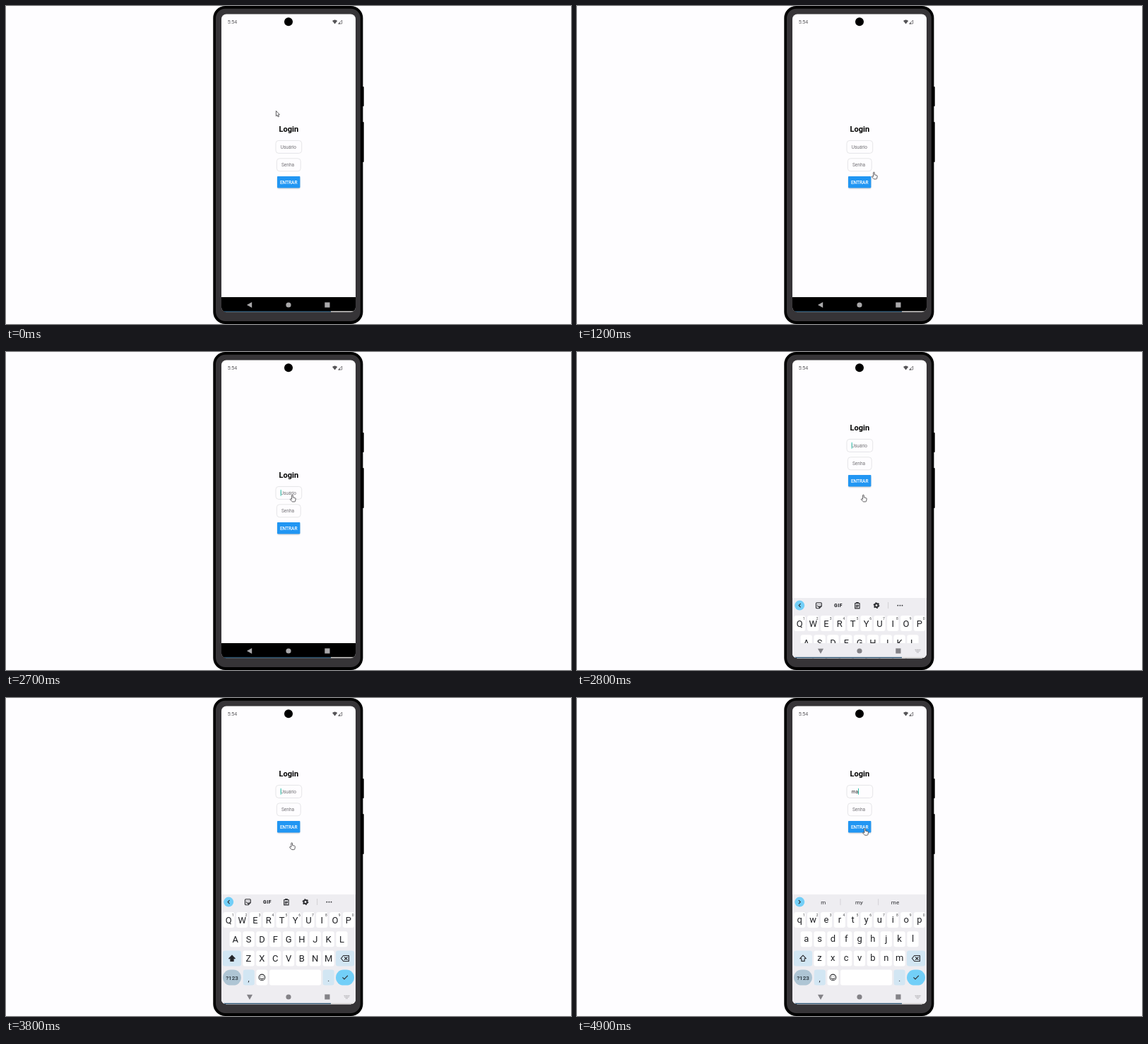
Animation, 800 px wide and 450 px high, one loop 5000 ms. Source, as an HTML page:

```html
<!DOCTYPE html>
<html lang="pt">
<head>
<meta charset="utf-8">
<title>Login</title>
<style>
html, body { margin: 0; width: 100%; height: 100%; overflow: hidden; background: #fefdff; }
svg { display: block; width: 100vw; height: 100vh; font-family: Roboto, sans-serif; }
.line { fill: none; stroke: #2c2d31; stroke-width: 1.15; stroke-linecap: round; stroke-linejoin: round; }
.mid { text-anchor: middle; }
.key { font-size: 13px; fill: #202125; }
.num { font-size: 5px; fill: #45464a; }
.field { fill: #fefdff; stroke: #dcdbde; stroke-width: .7; }
.label { font-size: 6.5px; fill: #717074; }
</style>
</head>
<body>
<svg viewBox="0 0 800 450">
  <defs>
    <clipPath id="screen"><rect x="305" y="11.5" width="190" height="421.8" rx="7"/></clipPath>
    <filter id="blur" x="-20%" y="-40%" width="140%" height="180%"><feGaussianBlur stdDeviation=".8"/></filter>
  </defs>
  <path d="M504 114h1.7q1 0 1 1v26q0 1-1 1h-1.7zM504 164h1.7q1 0 1 1v55q0 1-1 1h-1.7z"/>
  <rect x="293.3" width="212.1" height="450" rx="17"/>
  <rect x="297" y="3.7" width="204.8" height="442.2" rx="13.5" fill="#363437"/>

  <g clip-path="url(#screen)">
    <rect x="305" y="11" width="190" height="423" fill="#fefdff"/>
    <text x="313.7" y="25" font-size="7" fill="#5a595c">5:54</text>
    <path d="M462 21q3.6-3 7.2 0l-3.6 4.6z" fill="#555457"/>
    <path d="M475.7 20v5h-5z" fill="none" stroke="#656467" stroke-width=".8"/>
    <path d="M473 23v2.5h-3z" fill="#656467"/>
    <circle cx="400" cy="22.3" r="6"/>

    <g id="form">
      <text class="mid" x="400.3" y="177.6" font-size="11" font-weight="700">Login</text>
      <rect class="field" x="382" y="190.4" width="36.7" height="18" rx="4"/>
      <text class="label" id="user" x="388.8" y="201.7">Usuário</text>
      <rect id="caret" y="194.9" width="1" height="8.8" fill="#2fc0aa"/>
      <rect class="field" x="383.4" y="215.8" width="33.8" height="18" rx="4"/>
      <text class="label" x="390" y="227.2">Senha</text>
      <rect x="384.6" y="242.4" width="31.4" height="15.9" rx="1" opacity=".25" filter="url(#blur)"/>
      <rect x="384" y="241" width="32.4" height="16.4" rx=".8" fill="#2196f3"/>
      <text class="mid" x="400.2" y="251.7" font-size="6.5" font-weight="500" fill="#fff">ENTRAR</text>
    </g>

    <g id="board">
      <rect x="305" y="278" width="190" height="156" fill="#eeedf1"/>
      <circle cx="315.2" cy="288.6" r="7" fill="#72cff8"/>
      <path class="line" id="chevron" d="M1.1-2.2L-1.1 0 1.1 2.2"/>
      <g id="tools">
        <path class="line" d="M339.5 284.7h5.8q1 0 1 1v4l-3 3h-3.8q-1 0-1-1v-6q0-1 1-1zM346.3 289.7h-2q-1 0-1 1v2M340.3 289q1.2 1.8 2.6 1.2M341 287v.1M344 287v.1"/>
        <text class="mid" x="370" y="291" font-size="6.8" font-weight="900" letter-spacing=".5" fill="#2c2d31">GIF</text>
        <path class="line" d="M393.7 285.5h6.4v7.4h-6.4zM395.5 285.5v-1h2.8v1M395.3 288h3.2M395.3 289.5h3.2M395.3 291h2"/>
        <circle class="line" cx="424" cy="288.6" r="2.5" style="stroke-width:2"/>
        <circle class="line" cx="424" cy="288.6" r="3.8" stroke-dasharray="1.8 2.18" style="stroke-width:1.3;stroke-linecap:butt"/>
        <path d="M440.6 284v9" stroke="#c5c4c9" stroke-width=".7"/>
        <g fill="#2c2d31"><circle cx="454.3" cy="288.7" r=".9"/><circle cx="457.4" cy="288.7" r=".9"/><circle cx="460.5" cy="288.7" r=".9"/></g>
      </g>
      <g id="hints" class="mid" font-size="8" fill="#2c2d31">
        <text x="348.7" y="291.7">m</text><text x="399.5" y="291.7">my</text><text x="450.5" y="291.7">me</text>
        <path d="M373 284.2v9M426.6 284.2v9" stroke="#c9c8cd" stroke-width=".7"/>
      </g>
      <g id="keys"></g>
      <path class="line" id="shift" d="M320 364.2l4.3 4.5h-2.2v3.7h-4.2v-3.7h-2.2z"/>
      <path class="line" d="M477.8 364.5h7.6v8h-7.6l-3.4-4zM479.4 366.6l3.8 3.8M483.2 366.6l-3.8 3.8"/>
      <text class="mid" x="320" y="398.6" font-size="8.1" font-weight="500" fill="#26323a">?123</text>
      <text class="mid key" x="343.7" y="400.5" style="font-size:11px">,</text>
      <circle class="line" cx="362.4" cy="395.4" r="4.3"/>
      <path class="line" d="M360.2 396.7q2.2 2.4 4.4 0M360.8 394v.1M364 394v.1"/>
      <text class="mid key" x="456.7" y="400.5" style="font-size:11px">.</text>
      <path class="line" d="M476.8 395.7l2.2 2.2 4.6-4.7"/>
    </g>

    <rect id="bar" x="305" y="412" width="190" height="22"/>
    <g id="nav">
      <path id="back" d="M-4 0L3.2-4.1V4.1z"/>
      <circle cx="400" cy="423" r="3.6"/>
      <rect x="451.3" y="419.4" width="7.2" height="7.2"/>
    </g>
    <path id="mini" d="M478.6 421.3h8M479.3 423.2h6.6M481 425.1h3.2" stroke="#9a999e" stroke-width=".9" stroke-dasharray="1.2 .5"/>
    <path d="M308 432.5h152" stroke="#2d5674" stroke-width="1.4"/>
    <path d="M460 432.5h33" stroke="#d8d5d4" stroke-width="1.4"/>
  </g>

  <g id="cursor" fill="#fefdff" stroke="#454447" stroke-width=".85" stroke-linejoin="round">
    <path id="arrow" d="M-2.6-4.4V3L-.9 1.6.2 4.1 1.5 3.5.4 1.1 2.4.9z"/>
    <path id="hand" d="M-1.4 1.3V-4a.85.85 0 0 1 1.7 0V-1.2L3.2-.5Q4.3-.2 4.2.9L3.6 4Q3.4 4.9 2.6 4.9H-.2Q-.8 4.9-1.2 4.4L-3.6 1.7Q-3.7.8-2.9.8z"/>
  </g>
</svg>
<script>
const $ = id => document.getElementById(id);
const show = (id, on) => $(id).style.display = on ? '' : 'none';
const PITCH = 18.85, ROWS = ['QWERTYUIOP', 'ASDFGHJKL', 'ZXCVBNM'], LEFT = [315.3, 324.7, 343.5];

// Keyboard
const cap = (x, y, w, fill = '#fff', r = 3) =>
  `<rect x="${x}" y="${y}" width="${w}" height="22" rx="${r}" fill="${fill}"/>`;
let html = '';
ROWS.forEach((row, r) => [...row].forEach((c, i) => {
  const x = LEFT[r] + i * PITCH, y = 303 + r * 27.2;
  html += cap(x - 8.1, y, 16.2) + `<text class="mid key letter" x="${x}" y="${y + 15.8}">${c}</text>`;
  if (!r) html += `<text class="mid num" x="${x + 6.1}" y="308.6">${(i + 1) % 10}</text>`;
}));
const PALE = '#d2e6f3';
html += cap(307, 357.4, 26, PALE) + cap(467, 357.4, 26, PALE) +
  cap(307, 384.6, 26, '#aec5d4', 11) + cap(335.8, 384.6, 16, PALE) + cap(354.4, 384.6, 16) +
  cap(373, 384.6, 73) + cap(448.6, 384.6, 16, PALE) + cap(467, 384.6, 26, '#72cff8', 11);
$('keys').innerHTML = html;
const letters = document.querySelectorAll('.letter');

// Pointer: time, x, y
const PATH = [[0, 385, 152.8], [600, 409, 248], [700, 469.5, 328.5], [800, 476, 338], [1200, 421, 240],
  [1700, 406, 207], [2900, 406, 207], [3800, 405.2, 209.7], [4000, 405.2, 209.7], [4400, 408.3, 189.3], [5000, 408.3, 189.3]];
function pointer(t) {
  const i = PATH.findIndex(p => p[0] > t), [t0, x0, y0] = PATH[i - 1], [t1, x1, y1] = PATH[i];
  const k = (1 - Math.cos(Math.PI * (t - t0) / (t1 - t0))) / 2;
  return [x0 + (x1 - x0) * k, y0 + (y1 - y0) * k];
}

function draw(t) {
  const open = t >= 2800, typed = t >= 4600, hints = t >= 4700;
  const text = t >= 4900 ? 'ma' : typed ? 'm' : '';

  $('form').setAttribute('transform', `translate(0 ${open ? -67 : 0})`);
  $('user').textContent = text || 'Usuário';
  $('user').style.fill = text ? '#222' : '';
  const blink = Math.floor((t - (typed ? 4600 : 2700)) / 500) % 2 === 0;
  show('caret', t >= 2700 && blink);
  $('caret').setAttribute('x', 388.7 + (text ? text.length > 1 ? 9.3 : 5.7 : 0));

  show('board', open);
  $('board').setAttribute('transform', `translate(0 ${t < 2900 ? 70 : 0})`);
  letters.forEach((el, i) => {
    const c = ROWS.join('')[i];
    el.textContent = typed ? c.toLowerCase() : c;
    el.setAttribute('dy', typed ? -.8 : 0);
  });
  $('shift').style.fill = typed ? 'none' : '#202125';
  show('tools', !hints);
  show('hints', hints);
  $('chevron').setAttribute('transform', `translate(315.2 288.6) rotate(${hints ? 180 : 0})`);

  $('bar').setAttribute('fill', open ? '#eeedf1' : '#000');
  $('nav').setAttribute('fill', open ? '#838287' : '#aaa9ab');
  $('back').setAttribute('transform', `translate(345 423) rotate(${open ? -90 : 0})`);
  show('mini', open);

  $('cursor').setAttribute('transform', `translate(${pointer(t)})`);
  show('arrow', t < 200);
  show('hand', t >= 200);
}

const start = performance.now();
function tick() {
  const t = (performance.now() - start) % 5000;
  draw(Math.floor(t / 100) * 100);
  requestAnimationFrame(tick);
}
tick();
</script>
</body>
</html>
```
